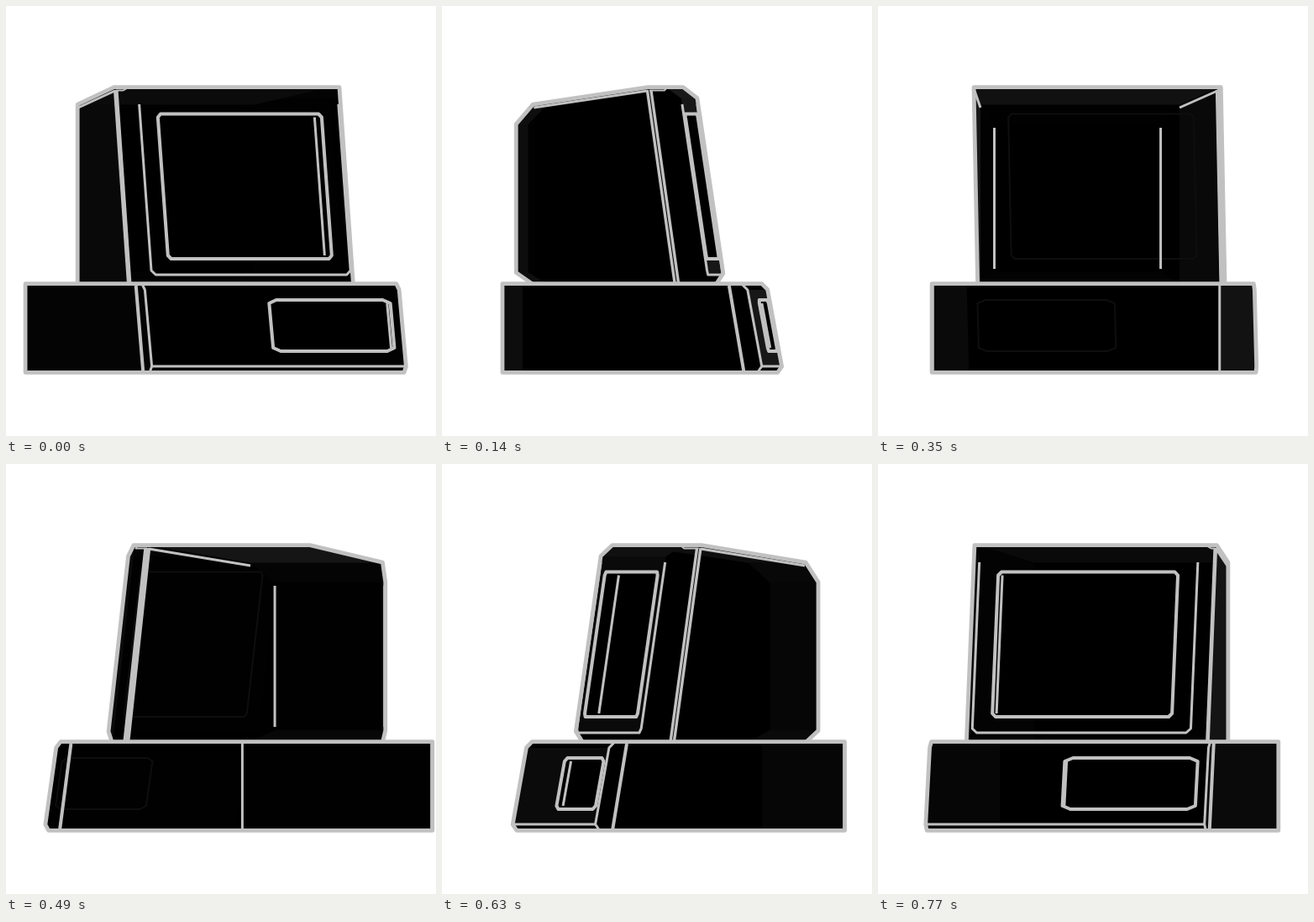
Recreate the animation shown at these times as an HTML page with a canvas. Size 512 by 512 pixels, loop 840 ms.

```html
<!DOCTYPE html>
<html lang="en">
<head>
<meta charset="utf-8">
<title>Turning computer</title>
<style>
  html, body { margin: 0; width: 100%; height: 100%; overflow: hidden; background: #fff; }
  canvas { display: block; }
</style>
</head>
<body>
<canvas id="stage" width="512" height="512"></canvas>
<script>
const ctx = document.getElementById('stage').getContext('2d');
const STEP_MS = 70, STEPS = 12, START_DEG = 29, STEP_DEG = 28.6;
const CENTER_X = 260.5, GREY = '#c1c1c1', SIDES = [-1, 1];
let sin = 0, cos = 1;

// Level orthographic camera, turning about the vertical axis: [screen x, y, depth]
const project = ([x, y, z]) => [CENTER_X + x * cos + z * sin, y, z * cos - x * sin];

// Points [x, y, z] of one half, mirrored to both sides
const mirror = half => half.flatMap(([x, y, z]) => [[x, y, z], [-x, y, z]]);
const onSide = (half, side) => half.map(([x, y, z]) => [x * side, y, z]);
const bridge = (a, b) => [...onSide([a, b], -1), ...onSide([b, a], 1)];

// Base: one profile extruded sideways
const BASE_W = 172.5;
const profile = [[331, -176.5], [331, 108], [338, 115], [429, 132], [436, 127], [436, -176.5]]
  .map(([y, z]) => [BASE_W, y, z]);
const baseFront = y => 115 + (y - 338) * 17 / 91;

// Monitor: back plate, rear ring, seam, bezel rim and bezel face
const backTop = [100, 141, -165], backLow = [100, 317, -165];
const rearTop = [119.7, 117.5, -143.6], rearLow = [119.7, 331, -143.6];
const seamTop = [146, 97, -6.5], seamLow = [146, 331, 27];
const rimTop = [146, 97, 16], rimLow = [146, 331, 50];
const faceTop = [135.6, 110, 33.5], faceLow = [135.6, 318, 64.5], faceEnd = [135.6, 331, 56];
const monitorFront = y => 34.5 + (y - 117) * 0.15;
const monitor = mirror([backTop, backLow, rearTop, rearLow, seamTop, seamLow,
  rimTop, rimLow, faceTop, faceLow, faceEnd]);

const baseFaces = [
  ...SIDES.map(s => onSide(profile, s)),
  bridge(profile[0], profile[5]),
  bridge(profile[2], profile[3])
];
const monitorFaces = [
  bridge(backTop, backLow), bridge(backTop, rearTop), bridge(backLow, rearLow),
  bridge(rearTop, seamTop), bridge(rimTop, faceTop), bridge(faceTop, faceLow),
  ...SIDES.flatMap(s => [
    onSide([backTop, rearTop, rearLow, backLow], s),
    onSide([rearTop, seamTop, seamLow, rearLow], s),
    onSide([rimTop, faceTop, faceLow, rimLow], s)
  ])
];

// Rectangle with cut corners, lying on a sloping front
function panel(x0, x1, y0, y1, cutX, cutY, front) {
  return [[x0 + cutX, y0], [x1 - cutX, y0], [x1, y0 + cutY], [x1, y1 - cutY],
    [x1 - cutX, y1], [x0 + cutX, y1], [x0, y1 - cutY], [x0, y0 + cutY]]
    .map(([x, y]) => [x, y, front(y)]);
}
const screen = panel(-111.5, 111.5, 128.5, 301, 4, 4, monitorFront);
const drive = panel(-5, 160, 350, 411, 10, 4, baseFront);
const bezel = [[-135.6, 117], [-135.6, 315], [-130, 320], [130, 320], [135.6, 315], [135.6, 117]]
  .map(([x, y]) => [x, y, monitorFront(y)]);

function trace(points, closed) {
  ctx.beginPath();
  points.forEach(p => ctx.lineTo(p[0], p[1]));
  if (closed) ctx.closePath();
}

function line(points, width = 3, closed = false, color = GREY) {
  trace(points.map(project), closed);
  ctx.lineWidth = width;
  ctx.strokeStyle = color;
  ctx.stroke();
}

function hull(points) {
  const sorted = points.map(project).sort((a, b) => a[0] - b[0] || a[1] - b[1]);
  const chain = list => {
    const out = [];
    for (const p of list) {
      while (out.length > 1) {
        const [a, b] = out.slice(-2);
        if ((b[0] - a[0]) * (p[1] - a[1]) - (b[1] - a[1]) * (p[0] - a[0]) > 0) break;
        out.pop();
      }
      out.push(p);
    }
    return out.slice(0, -1);
  };
  return [...chain(sorted), ...chain(sorted.reverse())];
}

// Faces at a grazing angle are slightly lighter; those turned away shine through weakly
function shade(face, middle) {
  const pts = face.map(project);
  const [a, b, c] = pts;
  const u = b.map((v, i) => v - a[i]), v = c.map((w, i) => w - a[i]);
  const n = [u[1] * v[2] - u[2] * v[1], u[2] * v[0] - u[0] * v[2], u[0] * v[1] - u[1] * v[0]];
  const outward = n.reduce((sum, w, i) => sum + w * (a[i] - middle[i]), 0);
  const facing = Math.abs(n[2]) / Math.hypot(...n);
  const level = Math.round((outward * n[2] > 0 ? 28 : 16) * (1 - facing) ** 3);
  trace(pts, true);
  ctx.fillStyle = `rgb(${level},${level},${level})`;
  ctx.fill();
}

function solid(points, faces, middleY, drawLines) {
  const outline = hull(points);
  trace(outline, true);
  ctx.fillStyle = '#000';
  ctx.fill();
  ctx.globalCompositeOperation = 'lighten';
  faces.forEach(face => shade(face, [CENTER_X, middleY, 0]));
  ctx.globalCompositeOperation = 'source-over';
  drawLines();
  // The outline sits slightly outside the body
  const xs = outline.map(p => p[0]);
  const middleX = (Math.min(...xs) + Math.max(...xs)) / 2;
  trace(outline.map(([x, y]) =>
    [x + Math.sign(x - middleX), y + 0.4 * Math.sign(y - middleY)]), true);
  ctx.lineWidth = 4.8;
  ctx.strokeStyle = GREY;
  ctx.stroke();
}

// Opening with the back edge of its recess showing inside
function recess(shape, depth) {
  if (cos < 0) return line(shape, 2, true, '#0e0e0e');
  ctx.save();
  trace(shape.map(project), true);
  ctx.fillStyle = '#000';
  ctx.fill();
  ctx.clip();
  const edge = sin > 0 ? [shape[2], shape[3]] : [shape[7], shape[6]];
  line(edge.map(([x, y, z]) => [x, y, z - depth]), 3);
  ctx.restore();
  line(shape, 4, true);
}

function monitorLines() {
  const near = sin > 0 ? -1 : 1;
  recess(screen, 17.5);
  if (cos > 0) line(bezel);
  for (const s of SIDES) {
    if (cos < 0) line(onSide([[100, 145, -165], [100, 313, -165]], s));
    // The rear part of each side tapers, so both can be seen from behind
    const sideVisible = -s * sin * 137 - cos * 26.3 > 0;
    if (sideVisible) line(onSide([[119.7, 121, -143.6], [146, 101, -6.5]], s));
  }
  for (const z of [-6.5, -2]) {
    line(onSide([[146, 100, z], [146, 331, z + 33]], near), cos > 0 ? 3.4 : 4.6);
  }
  line(onSide([[146, 100.5, -4], [146, 100.5, 14], [142, 98, 16]], near), 2);
}

function baseLines() {
  const near = sin > 0 ? -1 : 1;
  recess(drive, 8);
  if (cos > 0) {
    line(onSide(profile.slice(1, 5), near));
    line(onSide([profile[3]], -1).concat([profile[3]]));
  } else {
    SIDES.forEach(s => line(onSide([profile[0], profile[5]], s)));
  }
  if (cos > 0 || near > 0) line(onSide([[BASE_W, 333, 93], [BASE_W, 435, 110.5]], near), 4);
}

function frame() {
  const step = Math.floor(performance.now() / STEP_MS) % STEPS;
  const angle = (START_DEG + STEP_DEG * step) * Math.PI / 180;
  sin = Math.sin(angle);
  cos = Math.cos(angle);
  ctx.fillStyle = '#fff';
  ctx.fillRect(0, 0, 512, 512);
  ctx.lineJoin = 'round';
  solid(monitor, monitorFaces, 214, monitorLines);
  solid(mirror(profile), baseFaces, 384, baseLines);
  requestAnimationFrame(frame);
}
frame();
</script>
</body>
</html>
```
